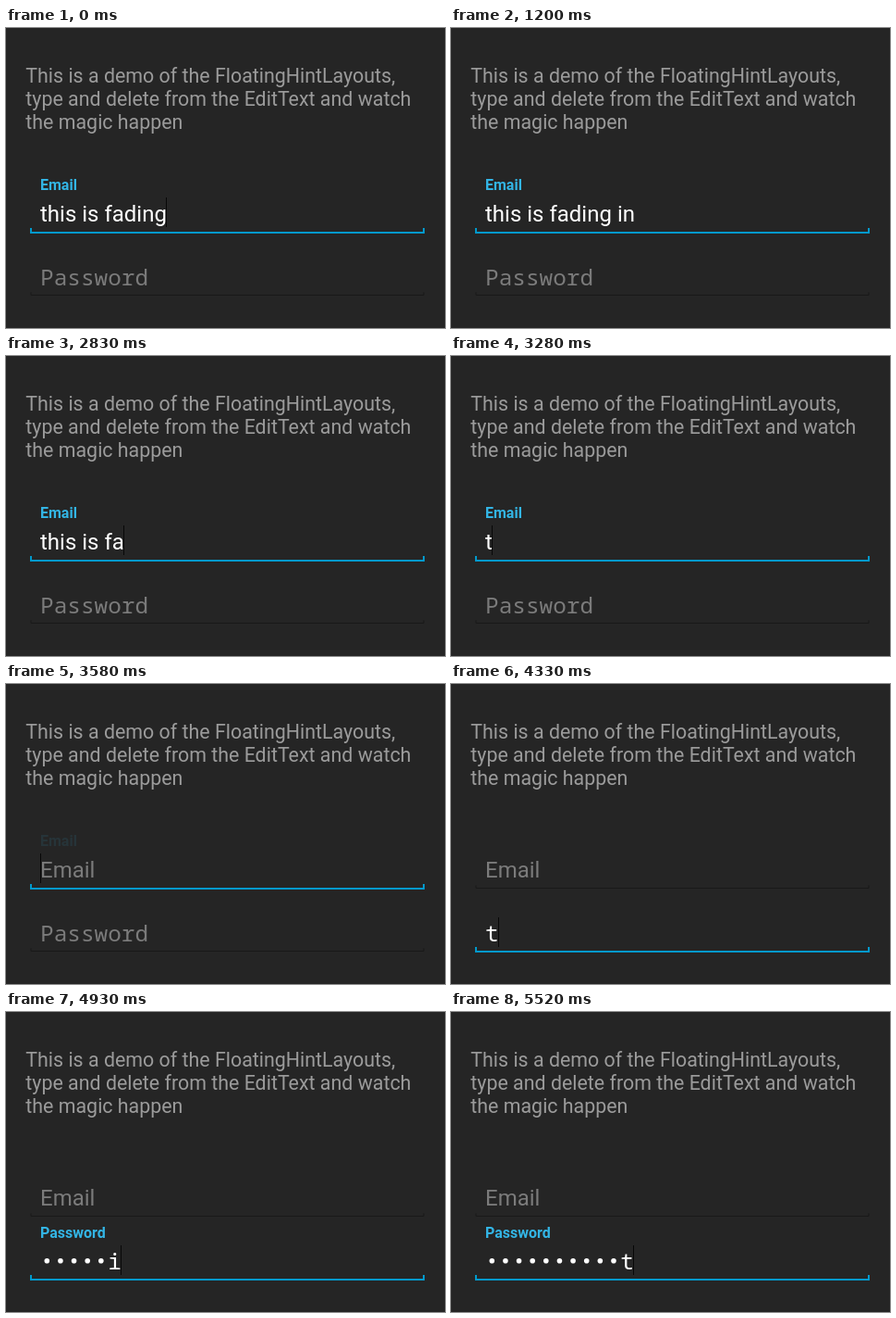
Write an HTML page that moves like this. It is 475 px wide and 324 px high and loops after 6700 ms.

```html
<!DOCTYPE html>
<html lang="en">
<head>
<meta charset="utf-8">
<title>Floating hint layouts</title>
<style>
  html, body { margin: 0; width: 100%; height: 100%; overflow: hidden; background: #252525; }
  svg { display: block; width: 475px; height: 324px; }
  text { font-family: Roboto, sans-serif; white-space: pre; }
  .intro { font-size: 21.4px; fill: #9b9b9b; }
  .entry { font-size: 24px; fill: #fff; }
  .hint { font-size: 24px; fill: #7b7b7b; }
  .mono { font-family: "Noto Sans Mono", monospace; font-size: 24.4px; }
  .label { font-size: 16px; font-weight: 700; fill: #33b5e5; }
  .dots { fill: #fff; }
  .cursor { fill: #070707; }
</style>
</head>
<body>
<svg id="stage" viewBox="0 0 475 324" xmlns="http://www.w3.org/2000/svg">
  <rect width="475" height="324" fill="#252525"/>
</svg>
<script>
const LOOP = 6700;
const BEAT = 148.5;
const LEFT = 37;
const CELL = 14.63;
const PHRASE = 'this is fading in';
const SECRET = 'this is not';

const ERASE_START = 2680;
const CLEARED = 3430;
const FOCUS_SWITCH = 3880;
const SECRET_START = 4330;
const SECRET_RESUME = 5370;

const stage = document.getElementById('stage');
const ruler = document.createElement('canvas').getContext('2d');
ruler.font = '24px Roboto, sans-serif';

const clamp = (value, low, high) => Math.min(high, Math.max(low, value));
const beatsSince = (start, time) => Math.floor((time - start) / BEAT);

function set(node, attrs) {
  for (const key in attrs) node.setAttribute(key, attrs[key]);
}

function add(tag, attrs, content = '') {
  const node = document.createElementNS('http://www.w3.org/2000/svg', tag);
  set(node, attrs);
  node.textContent = content;
  stage.append(node);
  return node;
}

function makeField(name, baseline, lineY, font = '') {
  return {
    lineY,
    labelY: baseline - 34,
    line: add('path', { fill: 'none' }),
    hint: add('text', { class: `hint ${font}`, x: LEFT, y: baseline }, name),
    label: add('text', { class: 'label', x: LEFT }, name),
    entry: add('text', { class: `entry ${font}`, x: LEFT, y: baseline }),
    cursor: add('rect', { class: 'cursor', y: baseline - 26, width: 1, height: 32 })
  };
}

['This is a demo of the FloatingHintLayouts,',
 'type and delete from the EditText and watch',
 'the magic happen'
].forEach((line, i) => add('text', { class: 'intro', x: 21.3, y: 58.5 + i * 25.3 }, line));

const email = makeField('Email', 209, 221);
const password = makeField('Password', 278, 289, 'mono');

const dotGroup = add('g', { class: 'dots' });
const dots = Array.from(SECRET, (_, i) => {
  const dot = add('circle', { cx: LEFT + (i + 0.5) * CELL, cy: 268.8, r: 2.8 });
  dotGroup.append(dot);
  return dot;
});

function drawField(field, { focused, text, textX = LEFT, cursorX, cursorOn, shown, drop = 0 }) {
  const y = focused ? field.lineY : field.lineY - 0.5;
  const tick = focused ? 5 : 3;
  set(field.line, {
    d: `M27 ${y - tick}V${y}H452V${y - tick}`,
    stroke: focused ? '#0099cc' : '#191919',
    'stroke-width': focused ? 2 : 1
  });
  set(field.hint, { opacity: text ? 0 : 1 });
  set(field.label, { opacity: shown, y: field.labelY + drop });
  set(field.entry, { x: textX });
  field.entry.textContent = text;
  set(field.cursor, { x: Math.floor(cursorX), opacity: focused && cursorOn ? 1 : 0 });
}

// A few single edits, then the held backspace key erases at a steady rate.
function emailLength(time) {
  if (time >= ERASE_START) {
    return Math.max(0, Math.round(12.4 - 2.75 * beatsSince(ERASE_START, time)));
  }
  return 14 + (time >= 150) + 2 * (time >= 600) - (time >= 2090) - (time >= 2530);
}

// Fast typing with a short pause after the second word.
function secretLength(time) {
  const limit = time < SECRET_RESUME ? 8 : SECRET.length;
  return clamp(Math.floor(1.3 + 1.35 * beatsSince(SECRET_START, time)), 0, limit);
}

function drawEmail(time, focused) {
  const text = PHRASE.slice(0, emailLength(time));
  const fade = clamp(0.55 - 0.45 * beatsSince(CLEARED, time), 0.1, 1);
  drawField(email, {
    focused, text,
    cursorX: LEFT + ruler.measureText(text).width,
    cursorOn: time < 1200 || time >= 1640,
    shown: text ? 1 : focused ? fade : 0
  });
}

function drawPassword(time, focused) {
  const count = secretLength(time);
  const last = count ? SECRET[count - 1] : '';
  const shown = clamp(0.6 * beatsSince(SECRET_START, time) - 0.4, 0, 1);
  drawField(password, {
    focused, shown,
    text: last,
    textX: LEFT + Math.max(0, count - 1) * CELL,
    cursorX: LEFT + count * CELL,
    cursorOn: last !== ' ',
    drop: 25 * (1 - shown)
  });
  dots.forEach((dot, i) => set(dot, { opacity: i < count - 1 ? 1 : 0 }));
}

function render(time) {
  const onPassword = time >= FOCUS_SWITCH;
  drawEmail(time, !onPassword);
  drawPassword(time, onPassword);
}

const start = performance.now();
function tick() {
  render((performance.now() - start) % LOOP);
  requestAnimationFrame(tick);
}
tick();
</script>
</body>
</html>
```
